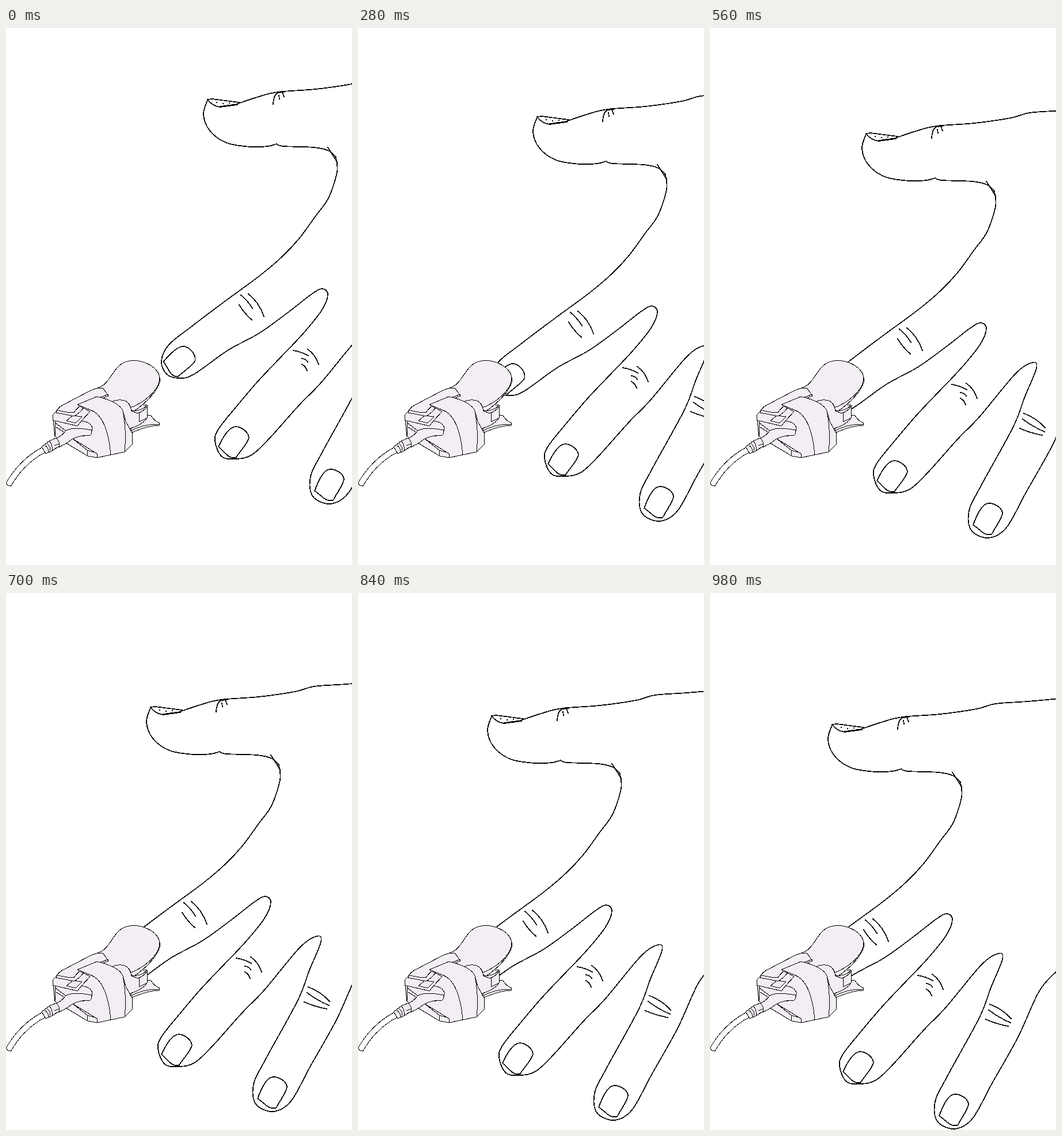
An HTML page for the animation above (1.28 s loop, 601 by 931 pixels).

```html
<!DOCTYPE html>
<html lang="en">
<head>
<meta charset="utf-8">
<title>Finger sensor</title>
<style>
  html, body { margin: 0; width: 100%; height: 100%; overflow: hidden; background: #fff; }
  svg { display: block; width: 100vw; height: 100vh; shape-rendering: crispEdges; }
  path { stroke: #000; stroke-linecap: round; stroke-linejoin: round; }
  #hand path { fill: none; stroke-width: 1.7; }
  #sensor path { fill: #f3edf4; stroke-width: 1; }
  #sensor .line { fill: none; }
  #sensor .sheath { fill: none; stroke-width: 11; stroke-linecap: butt; }
  #sensor .core { fill: none; stroke: #fff; stroke-width: 9; stroke-linecap: butt; }
</style>
</head>
<body>
<svg viewBox="0 0 601 931" preserveAspectRatio="none">
  <g id="hand"></g>
  <g id="sensor"></g>
</svg>
<script>
const STEP = 70, LAST = 14, LOOP = 1280;
const TRAVEL = { x: -138, y: 104 };
const hand = document.getElementById('hand');
const sensor = document.getElementById('sensor');

function add(parent, d, cls = '') {
  const path = document.createElementNS('http://www.w3.org/2000/svg', 'path');
  path.setAttribute('d', d);
  path.setAttribute('class', cls);
  parent.append(path);
  return path;
}

// Smooth curve through a few key points (Catmull-Rom as cubic segments).
function curve(text) {
  const p = text.split(' ').map(s => s.split(',').map(Number));
  let d = 'M' + p[0];
  for (let i = 0; i < p.length - 1; i++) {
    const a = p[i - 1] || p[i], b = p[i], c = p[i + 1], e = p[i + 2] || c;
    const c1 = b.map((v, k) => v + (c[k] - a[k]) / 6);
    const c2 = c.map((v, k) => v - (e[k] - b[k]) / 6);
    d += `C${c1} ${c2} ${c}`;
  }
  add(hand, d);
}

// All nails share one shape, turned along the finger.
function nail(x, y, angle) {
  add(hand, 'M-24,-17C-8,-20 4,-21 14,-18C27,-14 29,8 19,17C10,21 -8,18 -22,19Q-29,12 -27,2Z')
    .setAttribute('transform', `translate(${x} ${y}) rotate(${angle})`);
}

// A skin fold: flat at first, then bending down by `bend`.
function fold(x, y, dx, dy, bend = 2) {
  add(hand, `M${x},${y}q${dx / 2 + bend},${dy / 2 - bend} ${dx},${dy}`);
}

// Thumb
curve('403,131 436,120 472,111 538,106 601,97 634,88 690,84 745,79');
curve('350,125 343,150 354,178 383,199 425,206 455,205 470,201');
curve('470,201 482,205 535,207 561,213 573,224');
add(hand, 'M350,124L358,123L405,129L402,133L372,137Q358,135 350,124M372,136L402,132');
add(hand, 'M366,129h.1M377,131h.1M388,130h.1');
add(hand, 'M464,132Q465,115 473,112L483,111M474,117L475,123M480,112L483,119');
add(hand, 'M559,207L575,232');

// Outline from the thumb web around the three fingers
curve('573,224 575,250 560,295 537,327 510,364 480,396 440,430 380,474 319,520 283,549 270,577 279,600 301,607 327,600 385,559 440,529 490,493 530,462 549,452 559,462 ' +
  '548,490 515,531 475,573 438,612 403,653 370,694 363,716 375,743 400,747 427,740 458,711 509,654 548,614 609,541 639,521 646,531 ' +
  '626,580 606,632 549,736 529,778 533,812 563,825 594,807 628,746 673,666 710,586 742,550');

nail(303, 576, -40);
nail(397, 716, -54);
nail(563, 790, -60);

fold(408, 463, 20, 23);
fold(421, 461, 27, 39, 5);
fold(405, 480, 22, 26, -2);
fold(499, 559, 26, 9);
fold(524, 557, 19, 26, 4);
fold(514, 573, 10, 6);
fold(514, 583, 9, 11);
fold(624, 609, 37, 25, 4);
fold(622, 619, 38, 22, -2);
fold(617, 635, 39, 12, -2);
add(hand, 'M480,431h.1').style.strokeWidth = 1;

// Sensor, from back to front
const part = d => add(sensor, d);
const line = d => add(sensor, d, 'line');

const cable = 'M4,792C20,764 42,743 68,730';
add(sensor, cable, 'sheath');
add(sensor, cable, 'core');
line('M0,789L4,794L8,793');

// Lower jaw and plate
part('M245,671L252,672Q258,682 267,685L266,689Q247,689 217,702L207,700Z');
line('M218,698Q242,685 266,688');
part('M81,671L93,659L165,625L215,650L245,654V676L218,694L206,735L158,745L142,742L85,708Z');
part('M159,624C182,618 184,588 207,579C231,571 264,585 267,606V614C262,632 240,652 223,664L178,652Z');
line('M267,606C267,628 240,650 212,660');
part('M178,652Q190,642 206,646Q216,650 218,664Q236,664 245,654V676Q236,690 208,696Z');
line('M218,664L229,668Q240,664 245,656M231,667V683L245,676');

// Left shell and base
line('M81,671V680L124,690L131,681M85,682V707M86,685L105,699M87,692L100,700');
line('M104,716L112,709L141,732L158,737M141,732L142,742');
part('M87,667Q90,658 98,654L146,629Q161,622 169,625L178,638L143,650L127,667L119,673Z');
line('M87,662Q105,667 118,667Q124,657 137,650L178,635');
part('M105,681L116,672L132,674L121,685Z');

// Strap with its side face
part('M203,664L208,682L219,702V722L206,735Z');
part('M124,653L158,639Q197,648 203,664Q210,700 206,735L158,745V738L111,709L136,707Q151,703 150,693Q147,683 131,681L146,665Z');
line('M124,653L146,662Q176,672 182,740');

// Plug
part('M88,711Q96,708 104,698Q116,691 148,697Q151,702 146,706Q121,706 108,718L92,727Z');
part('M75,716L87,711Q93,715 93,725L80,733Z');
part('M62,726L75,716Q82,723 80,733L69,738Z');
line('M67,723Q74,728 74,735M71,720Q78,726 77,733M84,724L92,721M85,729L92,726');

function draw(time) {
  const step = Math.min(LAST, Math.floor((time % LOOP) / STEP));
  const x = Math.round(TRAVEL.x * step / LAST);
  const y = Math.round(TRAVEL.y * step / LAST);
  hand.setAttribute('transform', `translate(${x} ${y})`);
}

let start;
function tick(now) {
  start ??= now;
  draw(now - start);
  requestAnimationFrame(tick);
}
draw(0);
requestAnimationFrame(tick);
</script>
</body>
</html>
```
